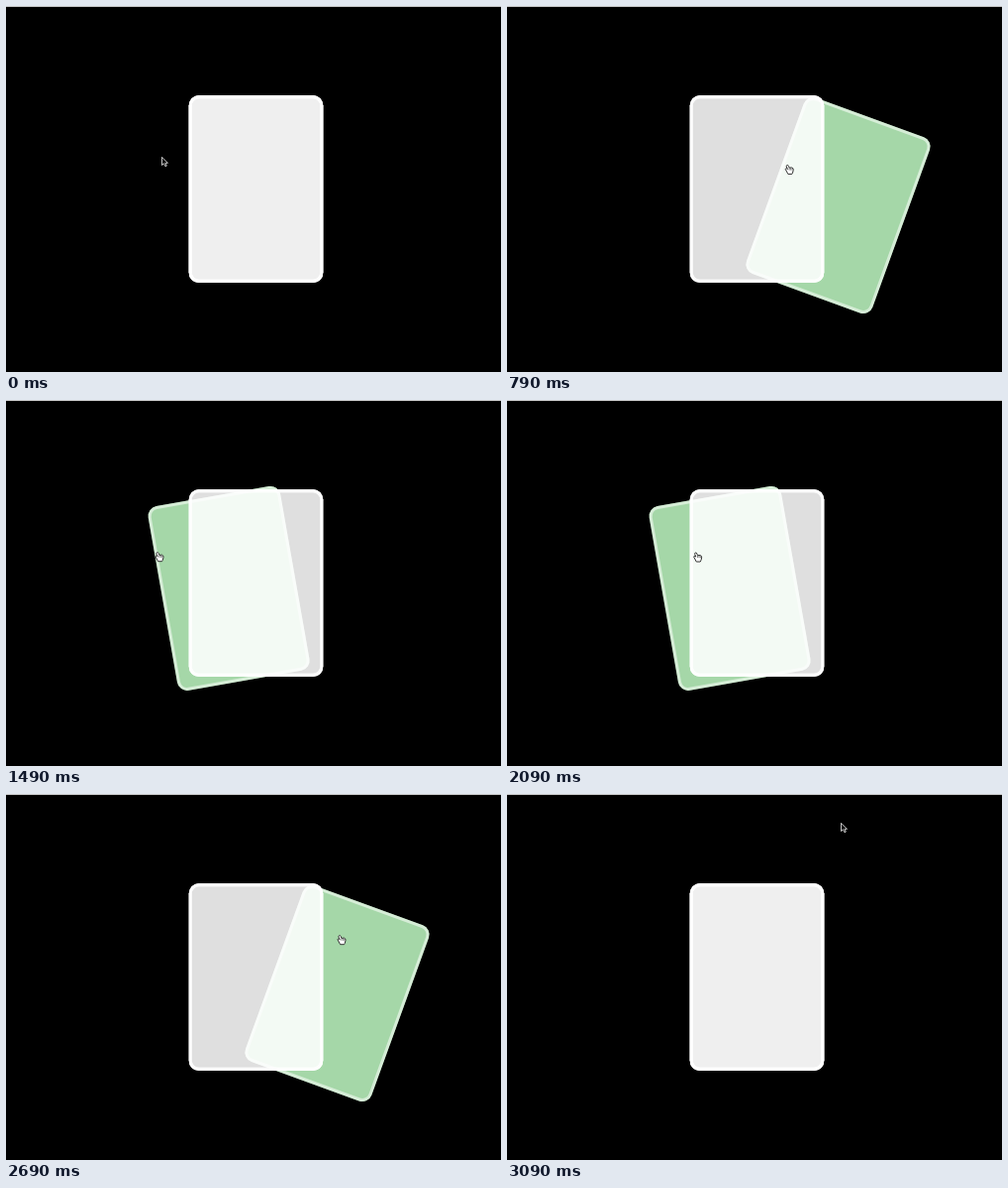
Animation of 500 by 369 pixels, one loop 3190 ms. Source, as an HTML page with a canvas:

```html
<!DOCTYPE html>
<html lang="en">
<head>
<meta charset="utf-8">
<title>Card fan</title>
<style>
  html, body { margin: 0; width: 100%; height: 100%; overflow: hidden; background: #000; }
  canvas { display: block; width: 500px; height: 369px; }
</style>
</head>
<body>
<canvas id="stage" width="500" height="369"></canvas>
<script>
const ctx = document.getElementById('stage').getContext('2d');
const LOOP = 3190;
const CARD = { x: 252.5, y: 184.6, w: 135.5, h: 188.5, radius: 10, border: 3 };

// moves: [start ms, duration ms, openness at the end]
const cards = [
  { angle: -20, dx: -82, dy: 16.5, moves: [] },
  { angle: -10, dx: -27.4, dy: 5.3, moves: [[1122, 300, 1], [2190, 300, 0]] },
  { angle: 10, dx: 27.4, dy: 5.3, moves: [[930, 110, 0.85], [1040, 180, 0]] },
  { angle: 20, dx: 82, dy: 16.5,
    moves: [[130, 240, 1], [1010, 180, 0], [2190, 300, 1], [2810, 240, 0]] }
];

// [ms, x, y]
const pointerPath = [
  [0, 157, 152], [90, 163, 153], [390, 313, 170], [490, 319, 168],
  [690, 315, 168], [1090, 196, 155], [1490, 155, 158], [1990, 155, 158],
  [2290, 268, 159], [2590, 337, 148], [2690, 339, 147], [2790, 339, 112], [3090, 340, 34]
];

const clamp = v => Math.max(0, Math.min(1, v));
const lerp = (a, b, p) => a + (b - a) * p;
const bezier = (a, b, u) => 3 * a * u * (1 - u) ** 2 + 3 * b * u * u * (1 - u) + u ** 3;

// cubic-bezier(.25, .1, .25, 1)
function ease(p) {
  if (p <= 0 || p >= 1) return clamp(p);
  let lo = 0, hi = 1;
  for (let i = 0; i < 20; i++) {
    const mid = (lo + hi) / 2;
    if (bezier(0.25, 0.25, mid) < p) lo = mid; else hi = mid;
  }
  return bezier(0.1, 1, lo);
}

// Only a card that opens fully turns green.
function cardState(card, t) {
  let open = 0, tint = 0;
  for (const [start, duration, to] of card.moves) {
    if (t < start) break;
    open = lerp(open, to, ease((t - start) / duration));
    tint = to === 1 ? clamp((t - start) / 40) : tint * (1 - clamp((t - start) / 110));
  }
  return { card, open, tint };
}

function drawCard({ card, open, tint }) {
  const { x, y, w, h, radius, border } = CARD;
  const alpha = lerp(0.5, 1, tint);
  const channel = green => Math.round(lerp(127.5, green, tint) / alpha);
  ctx.save();
  ctx.translate(x + card.dx * open, y + card.dy * open);
  ctx.rotate(card.angle * open * Math.PI / 180);
  ctx.beginPath();
  ctx.roundRect(-w / 2, -h / 2, w, h, radius);
  ctx.fillStyle = `rgba(${channel(165)}, ${channel(215)}, ${channel(168)}, ${alpha})`;
  ctx.fill();
  ctx.beginPath();
  ctx.roundRect((border - w) / 2, (border - h) / 2, w - border, h - border, radius - border / 2);
  ctx.strokeStyle = 'rgba(255, 255, 255, 0.55)';
  ctx.lineWidth = border;
  ctx.stroke();
  ctx.restore();
}

function pointerAt(t) {
  const next = pointerPath.findIndex(key => key[0] > t);
  if (next < 0) return pointerPath.at(-1).slice(1);
  const [t0, x0, y0] = pointerPath[next - 1], [t1, x1, y1] = pointerPath[next];
  const p = (t - t0) / (t1 - t0);
  return [lerp(x0, x1, p), lerp(y0, y1, p)];
}

const arrow = new Path2D('M0 0V8.2L2 6.5L3.4 9.4L4.8 8.8L3.5 6H6Z');
const hand = new Path2D('M-2.6-4.2Q-1.4-5-.8-3.4L-.2-1.7L2.6-1.8Q4.2-1.4 4 .6L3.3 3.3L2.6 4.7H-1.4L-4-.2Q-4-1.4-2.5-.8L-1.8-.2L-3-2.9Q-3.2-3.8-2.6-4.2Z');
const knuckles = new Path2D('M-.1-1.5V.8M1.4-1.4V.8M2.8-1V.9');

function drawPointer(t) {
  const [x, y] = pointerAt(t);
  ctx.save();
  ctx.lineJoin = 'round';
  if (t >= 190 && t < 2850) {
    ctx.translate(x, y);
    ctx.fillStyle = '#fff';
    ctx.strokeStyle = '#333';
    ctx.lineWidth = 1;
    ctx.fill(hand);
    ctx.stroke(hand);
    ctx.lineWidth = 0.6;
    ctx.stroke(knuckles);
  } else {
    const offset = t < 190 ? 0 : 1;
    ctx.translate(x + 0.5 - offset * 3, y + 0.3 - offset * 5);
    ctx.fillStyle = '#111';
    ctx.strokeStyle = '#d8d8d8';
    ctx.lineWidth = 0.9;
    ctx.fill(arrow);
    ctx.stroke(arrow);
  }
  ctx.restore();
}

function draw(now) {
  const elapsed = now % LOOP;
  // The picture advances in steps of a tenth of a second.
  const t = elapsed < 100 ? 0 : Math.floor((elapsed + 10) / 100) * 100 - 10;
  ctx.fillStyle = '#000';
  ctx.fillRect(0, 0, 500, 369);
  ctx.fillStyle = '#c4c4c4';
  ctx.fillRect(0, 0, 500, 1);
  // The highlighted card lies beneath the others.
  cards.map(card => cardState(card, t)).sort((a, b) => b.tint - a.tint).forEach(drawCard);
  drawPointer(t);
}

let began;
function tick(now) {
  began ??= now;
  draw(now - began);
  requestAnimationFrame(tick);
}
draw(0);
requestAnimationFrame(tick);
</script>
</body>
</html>
```
